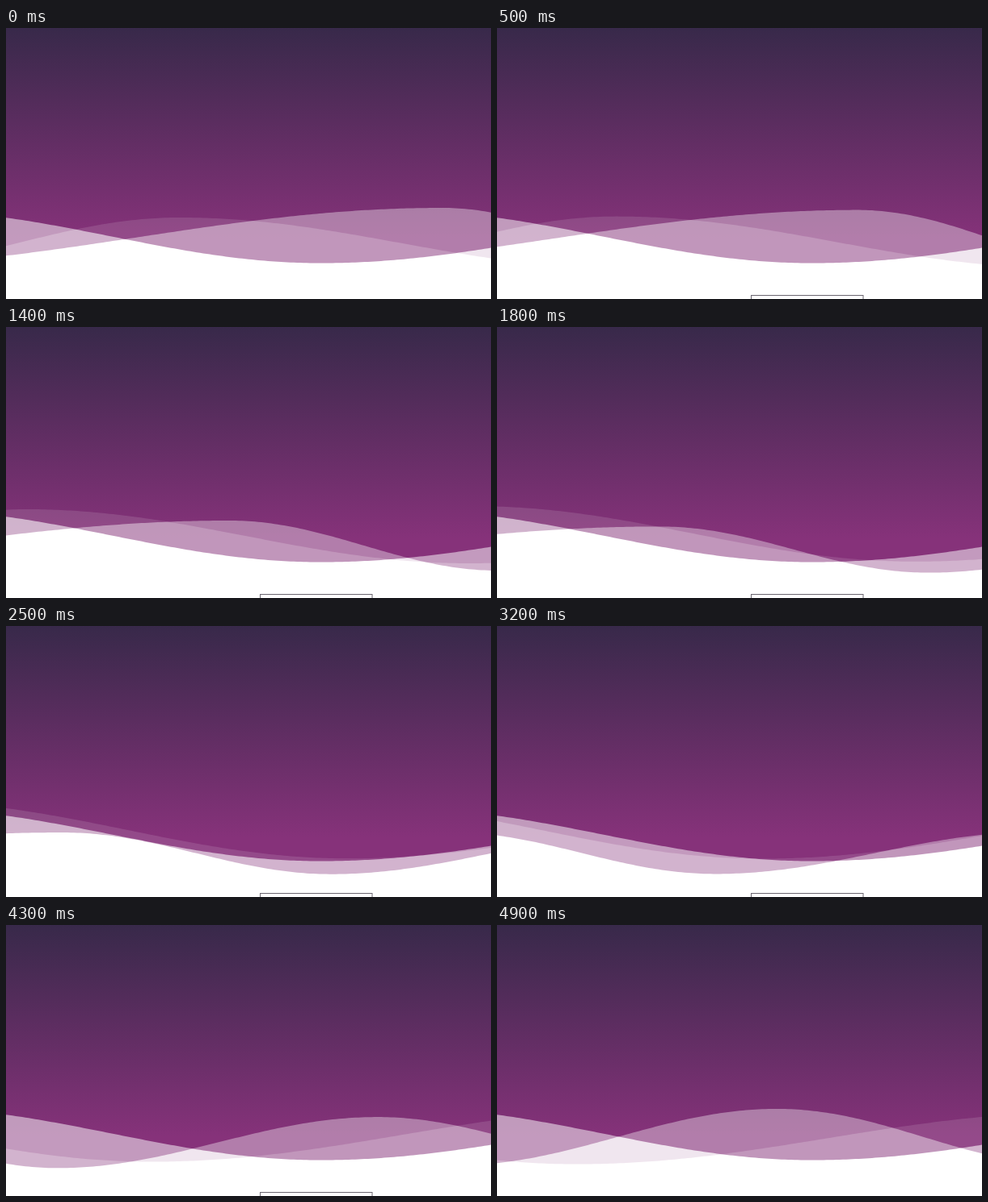
An HTML page with a canvas that plays this animation: 600x336 px, repeating every 5000 ms.

```html
<!DOCTYPE html>
<html lang="en">
<head>
<meta charset="utf-8">
<title>Waves</title>
<style>
html, body { margin: 0; width: 100%; height: 100%; overflow: hidden; }
body { background: linear-gradient(#38294a 0, #86327a 262px); }
canvas { display: block; }
</style>
</head>
<body>
<canvas id="stage" width="600" height="336"></canvas>
<script>
const W = 600, H = 336, LOOP = 5, STEP = 0.1, SWELL = 5.6;
const ctx = document.getElementById('stage').getContext('2d');

// turns: x of alternating troughs and crests at the start, drifting left by speed (px/s).
// trough, crest: mean height and how far it swings with the swell.
const waves = [
  { alpha: 0.51, speed: 0, turns: [-700, -126, 390, 970], trough: [291.5, 0], crest: [226, 0] },
  { alpha: 0.37, speed: 188, turns: [-215, 540, 872, 1268, 1630], trough: [302, -6], crest: [240, -17] },
  { alpha: 0.12, speed: 135, turns: [-185, 215, 760, 1380], trough: [293, 5], crest: [226, 9] }
];

function turnPoints({ speed, turns, trough, crest }, t) {
  const swell = Math.cos(2 * Math.PI * t / SWELL);
  return turns.map((x, i) => {
    const [mean, swing] = i % 2 ? crest : trough;
    return [x - speed * t, mean + swing * swell];
  });
}

// Half a cosine joins each trough to the next crest.
function height(points, x) {
  let i = 0;
  while (i < points.length - 2 && points[i + 1][0] <= x) i++;
  const [ax, ay] = points[i], [bx, by] = points[i + 1];
  const k = (x - ax) / (bx - ax);
  return ay + (by - ay) * (1 - Math.cos(Math.PI * k)) / 2;
}

function fillWave(wave, t) {
  const points = turnPoints(wave, t);
  ctx.globalAlpha = wave.alpha;
  ctx.beginPath();
  ctx.moveTo(0, H);
  for (let x = 0; x <= W; x += 4) ctx.lineTo(x, height(points, x));
  ctx.lineTo(W, H);
  ctx.fill();
}

function drawBox() {
  ctx.globalCompositeOperation = 'source-over';
  ctx.globalAlpha = 1;
  ctx.strokeStyle = '#6b6670';
  ctx.strokeRect(314.5, 331.5, 138.5, 20);
}

function draw(t) {
  ctx.clearRect(0, 0, W, H);
  // Opacities add up, so the overlap of all three is solid white.
  ctx.globalCompositeOperation = 'lighter';
  ctx.fillStyle = '#fff';
  waves.forEach(wave => fillWave(wave, t));
  if (t > 0.45 && t < 4.85) drawBox();
}

const start = performance.now();
function tick() {
  const t = (performance.now() - start) / 1000 % LOOP;
  draw(Math.floor(t / STEP) * STEP);
  requestAnimationFrame(tick);
}
tick();
</script>
</body>
</html>
```
